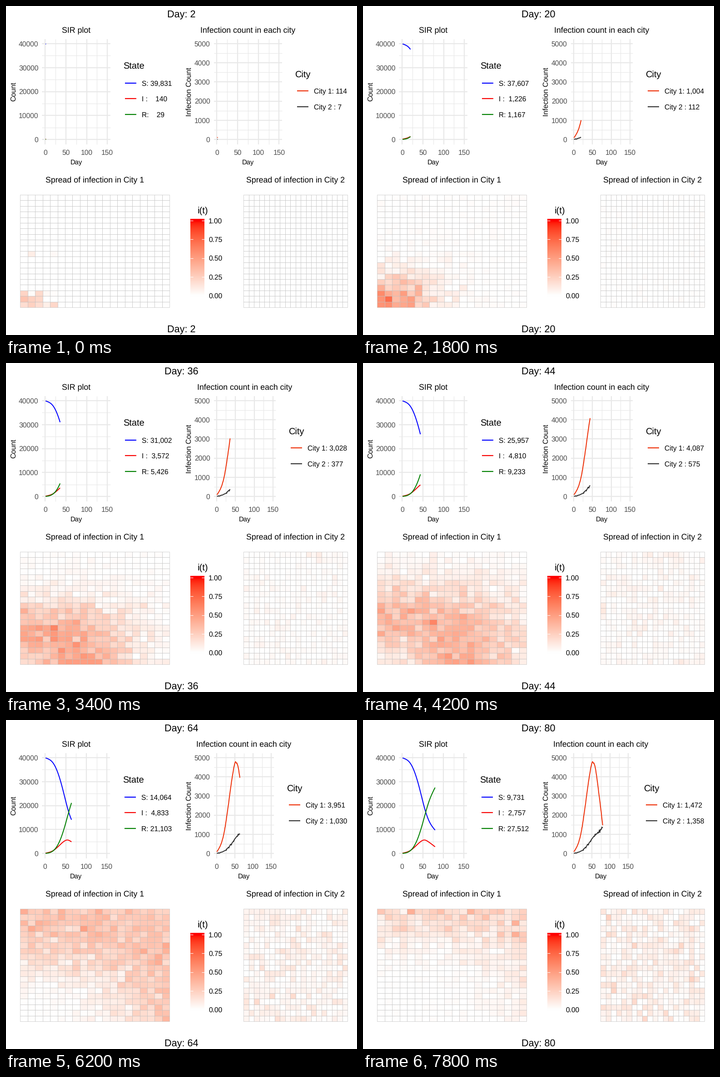
Recreate the animation shown at these times as a matplotlib script. Size 773 px wide and 725 px high, loop 8000 ms.

```python
import numpy as np
import matplotlib.pyplot as plt
from matplotlib.animation import FuncAnimation
from matplotlib.colors import ListedColormap

plt.rcParams["font.family"] = "Liberation Sans"
plt.rcParams["text.hinting"] = "none"

W, H, DPI = 773, 725, 100
PX = 72 / DPI
LAST = 80
N = 20
BLUE, RED, GREEN = "#0000ff", "#f80000", "#008000"
ORANGE, DARK = "#ee3008", "#333333"
TOP, BOTTOM, ZERO, FULL = 72.5, 304.5, 294, 83

rng = np.random.default_rng(11)
days = np.arange(1, LAST + 1)


def spline(xs, ys, x):
    """Natural cubic spline through a few points."""
    xs, ys = np.array(xs, float), np.array(ys, float)
    n, h, slope = len(xs), np.diff(xs), np.diff(ys) / np.diff(xs)
    a, b = np.eye(n), np.zeros(n)
    for i in range(1, n - 1):
        a[i, i - 1:i + 2] = h[i - 1], 2 * (h[i - 1] + h[i]), h[i]
        b[i] = 6 * (slope[i] - slope[i - 1])
    m = np.linalg.solve(a, b)
    i = np.clip(np.searchsorted(xs, x, side="right") - 1, 0, n - 2)
    d = x - xs[i]
    first = slope[i] - h[i] * (2 * m[i] + m[i + 1]) / 6
    return ys[i] + first * d + m[i] / 2 * d**2 + (m[i + 1] - m[i]) / (6 * h[i]) * d**3


def series(points, rough=0.0):
    """Daily values; the roughness fades out at the known days."""
    xs = np.array(list(points))
    y = spline(xs, list(points.values()), days)
    gap = np.abs(days[:, None] - xs).min(axis=1)
    y += rng.normal(size=LAST) * rough * np.sqrt(np.abs(y)) * np.minimum(1, gap / 2)
    return np.maximum(y, 0)


sus = series({2: 39831, 20: 37607, 36: 31002, 44: 25957, 54: 19206, 64: 14064, 80: 9731})
inf = series({2: 140, 20: 1226, 36: 3572, 44: 4810, 54: 5601, 64: 4833, 80: 2757})
rec = series({2: 29, 20: 1167, 36: 5426, 44: 9233, 54: 15193, 64: 21103, 80: 27512})
city1 = series({2: 114, 20: 1004, 36: 3028, 44: 4087, 50: 4690, 52: 4790, 54: 4745,
                58: 4610, 64: 3951, 80: 1472}, 0.3)
city2 = series({2: 7, 20: 112, 36: 377, 44: 575, 54: 843, 64: 1030, 80: 1358}, 1.1)


def lab_ramp(v):
    """White to red, blended in CIE Lab."""
    v = np.asarray(v)[:, None]
    lab = (1 - v) * np.array([100, 0, 0]) + v * np.array([53.24, 80.09, 67.2])
    fy = (lab[:, 0] + 16) / 116
    f = np.stack([fy + lab[:, 1] / 500, fy, fy - lab[:, 2] / 200], axis=1)
    xyz = f**3 * np.array([0.9505, 1, 1.089])
    to_rgb = np.array([[3.2406, -1.5372, -0.4986],
                       [-0.9689, 1.8758, 0.0415],
                       [0.0557, -0.2040, 1.0570]])
    lin = np.clip(xyz @ to_rgb.T, 0, 1)
    rgb = np.where(lin < 0.0031308, 12.92 * lin, 1.055 * lin**(1 / 2.4) - 0.055)
    return np.clip(rgb, 0, 1)


CMAP = ListedColormap(lab_ramp(np.linspace(0, 1, 256)))

# Infection wave: day of the peak and height of the peak in each cell
row, col = np.mgrid[0:N, 0:N]
reach = ((1.9 * col)**3 + (2.6 * row)**3)**(1 / 3)
peak = 21 + reach * (1.25 - reach / 160)
height = 0.48 - 0.002 * reach
seed = np.zeros((N, N))
seed[0, :5] = 0.22, 0.30, 0.22, 0.11, 0.26
seed[1, :3] = 0.38, 0.30, 0.26
seed[2, :5] = 0.28, 0.03, 0.25, 0.05, 0.02
seed[9, 1], seed[9, 4] = 0.12, 0.04
waves1 = rng.normal(size=(4, N, N))
waves2 = rng.normal(size=(4, N, N))


def drift(waves, day):
    """Unit-variance noise that changes slowly with time."""
    p, q = 2 * np.pi * day / 41, 2 * np.pi * day / 97
    a, b, c, d = waves
    return (a * np.cos(p) + b * np.sin(p) + c * np.cos(q) + d * np.sin(q)) / np.sqrt(2)


def scatter(mean, waves, day, k):
    sd = k * np.sqrt(mean * (1 - mean) / 50)
    return np.maximum(0, mean + sd * drift(waves, day))


def scaled(cells, count):
    return np.clip(cells * count / 20000 / cells.mean(), 0, 1)


def grid1(day):
    late = day - peak
    width = np.where(late < 0, 10.5, 11.5)
    wave = height * np.exp(-(late / width)**2 / 2) + 0.003
    keep = np.exp(-(day - 2) / 6)
    cells = keep * seed + (1 - keep) * scatter(wave, waves1, day, 1.15)
    return scaled(cells, city1[day - 1])


def grid2(day):
    share = city2[day - 1] / 20000
    return scaled(scatter(np.full((N, N), share), waves2, day, 1.7), city2[day - 1])


fig = plt.figure(figsize=(W / DPI, H / DPI), dpi=DPI, facecolor="white")
ax = fig.add_axes([0, 0, 1, 1])


def text(x, y, s, size, ha="center", color="black"):
    """Place text so that its capitals are centred on y."""
    ax.text(x, y + 0.36 * size, s, fontsize=size * PX, ha=ha, va="baseline", color=color)


def line(x, y, color, width, z=2):
    ax.plot(x, y, color=color, lw=width * PX, solid_capstyle="butt",
            solid_joinstyle="round", zorder=z)


def panel(left, right, top_value, step, title, ylabel, ylabel_x, curves, day):
    unit = (right - left) / 165
    px = lambda d: left + (d + 7.5) * unit
    py = lambda v: ZERO - v / top_value * (ZERO - FULL)
    for d in range(0, 151, 25):
        major = d % 50 == 0
        line([px(d)] * 2, [TOP, BOTTOM], "#e8e8e8", 2.2 if major else 1.1, 1)
        if major:
            text(px(d), 322, str(d), 15.6, color="#4d4d4d")
    for v in np.arange(0, top_value + 1, step / 2):
        major = v % step == 0
        line([left, right], [py(v)] * 2, "#e8e8e8", 2.2 if major else 1.1, 1)
        if major:
            text(left - 8, py(v), f"{v:.0f}", 15.6, "right", "#4d4d4d")
    for values, color in curves:
        line(px(days[:day]), py(values[:day]), color, 2)
    mid = (left + right) / 2
    text(mid, 51.5, title, 17.8)
    text(mid, 343.5, "Day", 14.8)
    ax.text(ylabel_x, 189, ylabel, fontsize=16 * PX, rotation=90,
            ha="center", va="center")


def legend(x, y, title, items):
    text(x - 0.7, y, title, 20, "left")
    for i, (label, color) in enumerate(items):
        yy = y + 38 + 34.6 * i
        line([x + 3, x + 28], [yy - 0.5] * 2, color, 2.2)
        text(x + 40, yy, label, 15.5, "left")


def heat(cells, left, right, title, title_x):
    text(title_x, 382, title, 17.8)
    ax.pcolormesh(np.linspace(left, right, N + 1), np.linspace(664, 416, N + 1), cells,
                  cmap=CMAP, vmin=0, vmax=1, edgecolors="#bebebe",
                  linewidth=0.65 * PX, antialiased=True)


def colorbar():
    text(433.5, 450, "i(t)", 20.3)
    ax.imshow(np.linspace(1, 0, 20)[:, None], cmap=CMAP, vmin=0, vmax=1, aspect="auto",
              extent=(406, 437, 642, 469), interpolation="bilinear")
    for i in range(5):
        y = 638 - 41.2 * i
        for x in (406, 431):
            line([x, x + 6], [y, y], "white", 1.1, 3)
        text(446, y, f"{i / 4:.2f}", 15.5, "left")


def draw(k):
    day = 2 + 2 * k
    s, i, r, c1, c2 = (int(round(v[day - 1])) for v in (sus, inf, rec, city1, city2))
    ax.clear()
    ax.axis("off")

    for y in (16.8, 710.3):
        text(386.3, y, f"Day: {day}", 21.7)

    lx = 258 if r >= 10000 else 259
    panel(79.4, lx - 29, 40000, 10000, "SIR plot", "Count", 17,
          [(sus, BLUE), (inf, RED), (rec, GREEN)], day)
    pad_i = " " * (2 if i >= 1000 else 4)
    pad_r = " " * (1 if r >= 1000 else 3 if r >= 100 else 4)
    legend(lx, 132, "State", [(f"S: {s:,}", BLUE), (f"I :{pad_i}{i:,}", RED),
                              (f"R:{pad_r}{r:,}", GREEN)])

    rx = 620 if c2 >= 1000 else 624 if c1 >= 1000 else 638
    panel(457.5, rx - 29.8, 5000, 1000, "Infection count in each city", "Infection Count",
          404, [(city1, ORANGE), (city2, DARK)], day)
    legend(rx, 149.5, "City", [(f"City 1: {c1:,}", ORANGE), (f"City 2 : {c2:,}", DARK)])

    heat(grid1(day), 31.3, 360.3, "Spread of infection in City 1", 195.3)
    heat(grid2(day), 523.3, 752, "Spread of infection in City 2", 637.5)
    colorbar()
    ax.set_xlim(0, W)
    ax.set_ylim(H, 0)
    return []


anim = FuncAnimation(fig, draw, frames=40, init_func=lambda: [], interval=200,
                     repeat=True, repeat_delay=0, blit=False)
plt.show()
```
